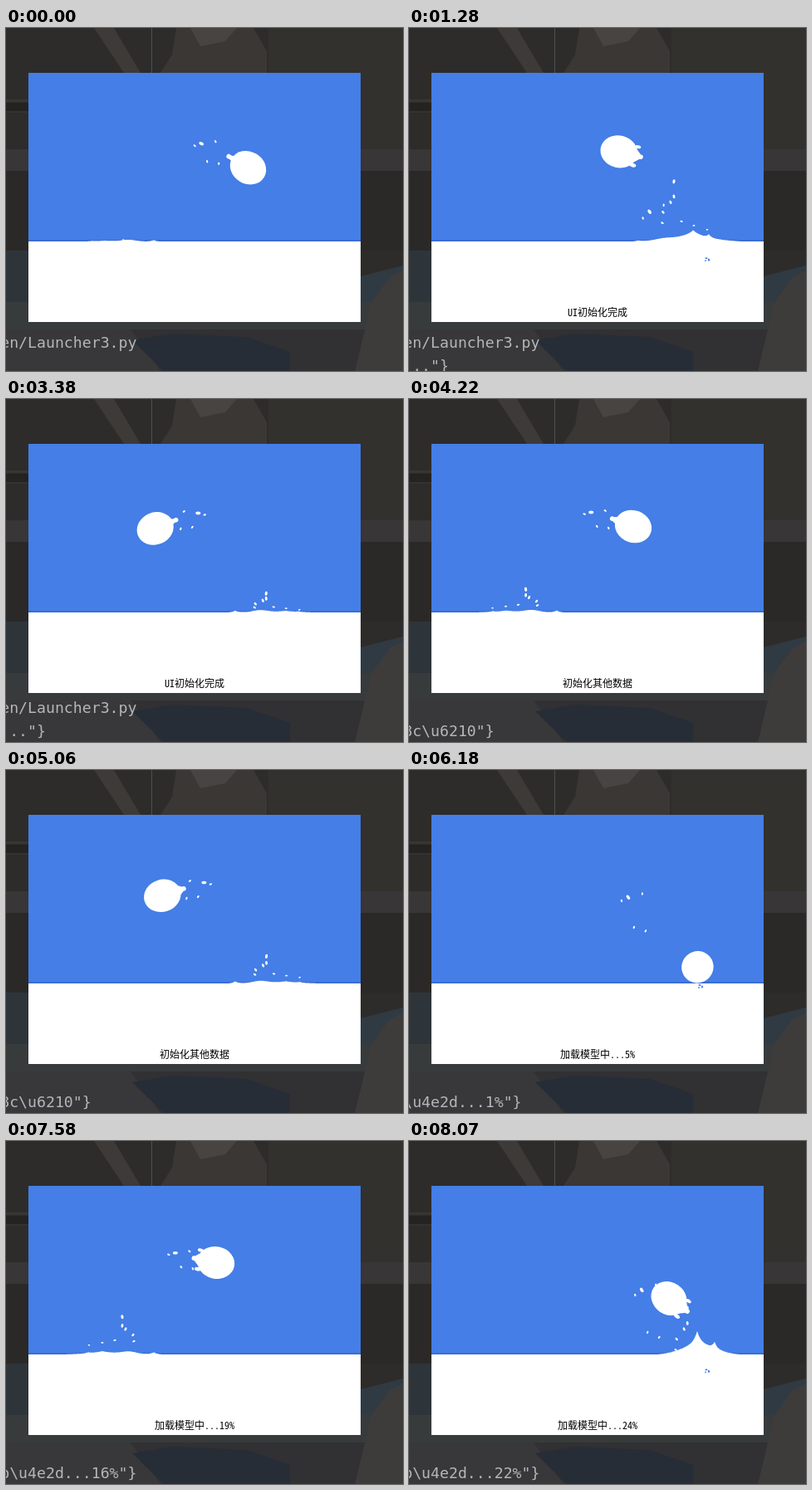
Recreate the animation shown at these times as an HTML page with a canvas. Size 478 by 413 pixels, loop 8.14 s.

```html
<!DOCTYPE html>
<html lang="zh">
<head>
<meta charset="utf-8">
<style>
html, body { margin: 0; width: 100%; height: 100%; overflow: hidden; background: #2d2c2a; }
canvas { display: block; }
</style>
</head>
<body>
<canvas id="stage" width="478" height="413"></canvas>
<script>
const ctx = document.getElementById('stage').getContext('2d');
const LOOP = 8140, STEP = 70, RESUME = 1210;
const HALF = 12.2;              // steps from one landing to the next
const MID = 227, SEA = 257;
const BLUE = '#447ee6';

// Places of the drops around the first one
const TRAIL = [[0, 0], [-8, 2], [17, -2], [7, 17], [21, 19]];
const SPRAY = [[0, 0], [0, 18], [4, 25], [13, 37], [14, 50], [-9, 48], [-24, 53], [-40, 58]];

const clamp = v => Math.max(0, Math.min(1, v));
const bell = (v, width) => Math.exp(-((v / width) ** 2));
const spike = (v, width) => Math.exp(-Math.abs(v) / width);

function poly(color, ...p) {
  ctx.fillStyle = color;
  ctx.beginPath();
  for (let i = 0; i < p.length; i += 2) ctx.lineTo(p[i], p[i + 1]);
  ctx.fill();
}

function rect(color, x, y, w, h) {
  ctx.fillStyle = color;
  ctx.fillRect(x, y, w, h);
}

function oval(color, x, y, rx, ry = rx, turn = 0) {
  ctx.fillStyle = color;
  ctx.beginPath();
  ctx.ellipse(x, y, rx, ry, turn, 0, 7);
  ctx.fill();
}

function backdrop() {
  rect('#2d2c2a', 0, 0, 478, 413);
  rect('#32312d', 316, 0, 162, 146);
  poly('#3d3a37', 106, 0, 130, 0, 162, 54, 142, 54);
  poly('#3a3735', 205, 0, 298, 0, 314, 28, 314, 54, 186, 54, 200, 32);
  poly('#484441', 222, 0, 278, 0, 264, 16, 234, 22);
  rect('#504e4c', 175, 0, 1, 54);
  rect('#383633', 0, 86, 27, 3);
  rect('#242322', 0, 90, 27, 10);
  rect('#343230', 0, 100, 27, 2);
  rect('#383637', 0, 146, 478, 26);
  rect('#2a2928', 0, 172, 478, 96);
  rect('#2e353a', 0, 268, 27, 62);
  poly('#303a43', 427, 299, 478, 286, 478, 330, 427, 330);
  rect('#383b3c', 0, 330, 478, 33);
  rect('#313032', 0, 363, 478, 50);
  poly('#383739', 0, 363, 150, 363, 186, 413, 0, 413);
  poly('#262d37', 152, 376, 200, 368, 290, 372, 342, 390, 342, 413, 190, 413);
  poly('#3e3b3b', 440, 330, 462, 300, 478, 292, 478, 413, 420, 413);
}

function drop(x, y, size, turn) {
  if (y < SEA) oval('#fff', x, y, size, size * .6, turn);
}

// Drops shaken off the ball, drifting apart as they fall
function trail(s) {
  const u = s - 8, age = s - 8.8;
  const x = -66 + 150 * (1 - Math.exp((6.15 - s) / 5));
  const y = 134 + .9 * u * u + 3.5 * Math.abs(u);
  TRAIL.forEach(([dx, dy], i) => {
    const spread = Math.max(0, age);
    drop(x + dx - .7 * age, y + dy + (dy - 10) / 3 * spread, i ? 1.8 : 3, clamp(age / 2) + i * .3);
  });
}

// Drops thrown up by the splash
function spray(s) {
  const age = s - 6.15;
  const x = -88 - 2.5 * Math.abs(s - 6), y = 184 + 3.3 * (s - 4.9) ** 2;
  SPRAY.forEach(([dx, dy], i) => {
    drop(x + dx + 3.3 * age, y + dy * clamp(1 - .25 * age), 2.6 - .18 * i, 1.4 + i * .3);
  });
}

function wave(s) {
  const age = s - 2.6;
  const swell = (s / 2.6) ** 2 * Math.exp(2 - s / 1.3);
  const ripple = 2.6 * bell(s - 8, 3);
  const height = x => 12 * swell * bell(x + 122 - 4 * age, 30 + 5 * age)
    + 17 * swell * spike(x + 120 - 1.7 * age, 5 + 1.4 * Math.max(0, age))
    + 8 * swell * spike(x + 141 - 2.5 * age, 3)
    + ripple * (bell(x + 79, 12) + spike(x + 49, 4));
  ctx.beginPath();
  ctx.moveTo(-200, SEA + 1);
  for (let x = -200; x <= 0; x++) ctx.lineTo(x, SEA - Math.max(0, height(x) - .8));
  ctx.lineTo(0, SEA + 1);
  ctx.fillStyle = '#fff';
  ctx.fill();
}

function ball(s) {
  const x = 21.5 * (s - 6.6), off = x - 5.5;
  const bend = off < 0 ? .0055 : .0071;
  const y = 143.5 + bend * off * off + 22 * Math.max(0, 2.5 - s) ** 2;
  const round = clamp((s - 9.8) / 2.2);
  const tail = 27 - 12 * round, root = 17.5 - 11 * clamp((s - 8.2) / .6);
  ctx.save();
  ctx.translate(x, y);
  ctx.rotate(Math.atan(1.4 * bend * off));
  oval('#fff', 0, 0, 22.5 - 3.5 * round, 19.4);
  ctx.beginPath();
  ctx.moveTo(-7, -root);
  ctx.quadraticCurveTo(-16, -root * .7, -tail, -2);
  ctx.lineTo(-tail, 2);
  ctx.quadraticCurveTo(-16, root * .7, -7, root);
  ctx.fill();
  oval('#fff', -tail, 0, 2.8);
  if (s < 8.2) {
    oval('#fff', -21, -11, 3.5, 2);
    oval('#fff', -20, 12, 4, 2.2);
  }
  ctx.restore();
}

function bubbles(s) {
  const x = -124 - 8 * clamp(s / 2.6), y = 260 + 20 * Math.sin(Math.PI * s / 8.5);
  oval(BLUE, x - 2, y + 1, 1.1, 1.6);
  oval(BLUE, x + 1, y - 1, 1.6, .9);
  oval(BLUE, x + 2, y + 2, .9);
}

// One crossing, drawn as if travelling right
function flight(s, dir) {
  ctx.save();
  ctx.translate(MID, 0);
  ctx.scale(dir, 1);
  wave(s);
  if (s > 2 && s < 10.5) spray(s);
  if (s > 5.4 && s < 18) trail(s);
  if (s > .9 && s < 13.4) ball(s);
  if (s < 7) bubbles(s);
  ctx.restore();
}

function scene(n) {
  // The jumping runs a little slow for a while after step 21
  const phase = n - 2.6 - 2.2 * clamp((n - 21) / 17);
  const k = Math.floor(phase / HALF), s = phase - k * HALF;
  const dir = k % 2 ? 1 : -1;
  ctx.save();
  ctx.beginPath();
  ctx.rect(27, 54, 400, 300);
  ctx.clip();
  rect(BLUE, 27, 54, 400, 300);
  rect('#3a6cd6', 27, SEA - 2, 400, 2);
  rect('#fff', 27, SEA, 400, 97);
  flight(s + HALF, -dir);
  flight(s, dir);
  ctx.restore();
}

function caption(text) {
  const wide = c => c > '~' ? 12 : 6;
  let x = MID - [...text].reduce((sum, c) => sum + wide(c), 0) / 2;
  ctx.fillStyle = '#000';
  ctx.font = '12px "Noto Sans Mono CJK SC", "Noto Sans CJK SC", "Noto Sans CJK", sans-serif';
  for (const c of text) {
    ctx.fillText(c, x, 347);
    x += wide(c);
  }
}

function log(text, y) {
  ctx.fillStyle = '#b4b6b8';
  ctx.font = '18.2px "DejaVu Sans Mono", monospace';
  ctx.fillText(text, -6.8, y);
}

function consoleText(t) {
  const pct = Math.floor((t - 6085) / 90);
  if (pct >= 1) {
    log((pct > 9 ? 'b' : '') + '\\u4e2d...' + pct + '%"}', 406);
  } else if (t >= 4150) {
    log('8c\\u6210"}', 406);
  } else {
    const lift = t >= 2260 ? 7 : 0;
    log('en/Launcher3.py', 385 - lift);
    if (t >= 620) log('..."}', 413 - lift);
  }
}

function draw() {
  const now = performance.now() % LOOP;
  const late = now >= RESUME;
  const n = late ? 7 + Math.floor((now - RESUME) / STEP) : Math.min(6, Math.floor(now / STEP));
  const t = late ? RESUME + (n - 7) * STEP : now;
  backdrop();
  consoleText(t);
  scene(n);
  if (t >= 5760) caption('加载模型中...' + Math.floor((t - 5660) / 100) + '%');
  else if (t >= 4010) caption('初始化其他数据');
  else if (late) caption('UI初始化完成');
  requestAnimationFrame(draw);
}
draw();
</script>
</body>
</html>
```
